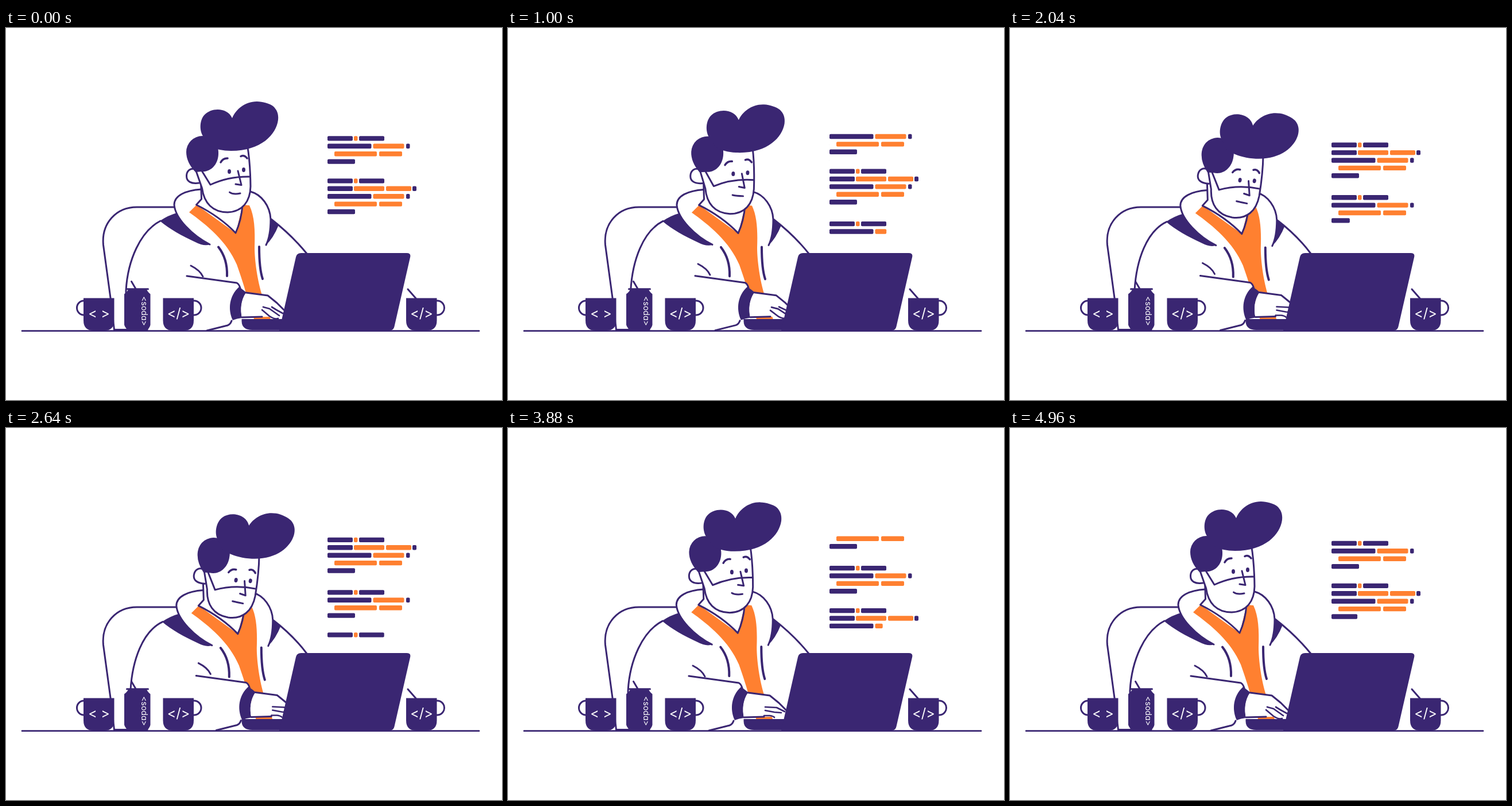
Write an HTML page that moves like this. It is 864x648 px and loops after 5000 ms.

```html
<!DOCTYPE html>
<html lang="en">
<head>
<meta charset="utf-8">
<title>Coding at the desk</title>
<style>
  html, body { margin: 0; width: 100%; height: 100%; overflow: hidden; background: #fff; }
  svg { display: block; width: 100vw; height: 100vh; }
  .line { fill: none; stroke: #3a2672; stroke-width: 3; stroke-linecap: round; stroke-linejoin: round; }
  .white { fill: #fff; }
  .navy { fill: #3a2672; }
  .orange { fill: #ff8030; }
  text { fill: #fff; font-family: Inter, sans-serif; }
  .tag { font-size: 23.5px; text-anchor: middle; }
  .soda { font-size: 14px; text-anchor: middle; font-feature-settings: "cv11"; }
</style>
</head>
<body>
<svg viewBox="0 0 864 648" xmlns="http://www.w3.org/2000/svg">
  <g id="code"></g>

  <path class="line" d="M188.500 525.500 L182 470 L169.500 378 C166 340 192 312 228 312 H300"/>
  <path class="line" d="M188.500 525.500 H246"/>
  <path class="line" id="back"/>
  <path class="line" id="farArm"/>

  <g id="body">
    <path class="navy" d="M268 336 Q283 326 298 322 Q318 350 356 377 Q345 381 330 373 C306 362 285 350 268 336 Z"/>
    <path class="navy" d="M459 331 L475 343 Q466 366 452 379 Q461 360 459 331 Z"/>
    <path class="white" d="M340 281 C312 283 293 292 293 308 C295 332 325 362 355 377 L440 400 L452 379 C459 368 461 350 461 333 C460 310 445 290 426 285 Z"/>
    <path class="line" d="M340 281 C312 283 293 292 293 308 C295 332 325 362 355 377"/>
    <path class="line" d="M426 285 C445 290 460 310 461 333 C461 350 459 366 453 378"/>
    <path class="orange" d="M319 321 L332 308 L400 357 L412 308 L424 309 C433 328 434 352 433 382 C433 405 438 440 446 465 L462 510 H433 L418 462 C415 450 410 435 402 412 C385 372 350 343 319 321 Z"/>
    <path class="white" d="M340 266 V298 L331 307 L400 357 L412 309 L420 285 Z"/>
    <path class="line" d="M339.500 266 L340.500 298 L331.500 308 Q372 328 400 357 Q410 335 412 308"/>
    <path class="line" style="stroke-width:4" d="M370 381.500 Q386 402 385 432 M441 381 C441 403 442 422 447 437"/>
  </g>

  <path class="navy" d="M410.500 507 H484 V526 H429 Q411 526 410.500 511 Z"/>

  <g id="arm">
    <path class="white" d="M315 432 L402 444 Q407 446 408 453 L393 512 Q391 517 386 518 L349 527 H300 Z"/>
    <path class="line" d="M315 432 L402 444 Q406 446 408 453 M393 510 Q391 516 386 518 L350 527"/>
    <path class="line" id="crease" d="M322 414 Q338 422 343 433"/>
    <path class="navy" d="M406 451 Q413 456 419 461 C409 474 408 490 411 505 Q402 506 395 509 C386 490 389 466 406 451 Z"/>
    <path class="white" id="palm"/>
    <path class="line" d="M418 461 L456 466 Q461 470 472 479 L484 491 M411 504 L446 503"/>
    <path class="line" style="stroke-width:2.700" id="fingers"/>
  </g>

  <path class="navy" d="M514 392 H698 Q706 392 704 399.500 L676.500 520 Q675 527 668 527 H476 L505 399 Q506.500 392 514 392 Z"/>

  <g id="head">
    <path class="line" style="fill:#fff" d="M333 247 C321 242 314.500 249 314.500 258 C314.500 267 322 272 336 270"/>
    <path class="line" style="fill:#fff" d="M330 246 L341.500 279 C345 305 360 321 386 321 C412 320 425.500 302 426 276 Q425.500 235 420.500 205"/>
    <g id="face">
      <path class="line" d="M335 239 L356 273 Q388 258 425.500 259"/>
      <ellipse class="navy" cx="389" cy="250" rx="3" ry="4"/>
      <ellipse class="navy" cx="414" cy="247" rx="3" ry="4"/>
      <path class="line" d="M404 249 L410 273.500 L400 272"/>
      <path class="line" id="mouth"/>
      <path class="line" id="brows" style="stroke-width:3.500" d="M374 234 Q378 226.500 386 227 M409 223.500 Q415 220.500 420 227"/>
    </g>
    <path class="navy" d="M314 216 A28 28 0 0 1 370 216 C371 236 358 251 341 250 L330 251 Q314 234 314 216 Z"/>
    <path class="navy" d="M345 191 C336 180 337 160 346 151 C358 138 386 138 394 157 C400 142 416 128 437 128 C447 128 460 132 465 136 C472 142 475 150 474 160 C471 185 445 214 392 214 C378 214 365 211 356 206 Z"/>
  </g>

  <path class="line" style="stroke-width:2.800" d="M28 527.700 H824"/>

  <path class="line" d="M218.500 441.500 L227 456 M210.500 454.700 H247.500"/>
  <path class="navy" d="M213 455 H245 Q246 459 251.500 463.500 V517 Q251 521 246 526.500 H212 Q207 521 206 517 V463.500 Q212 459 213 455 Z"/>
  <text class="soda" transform="translate(236 493) rotate(90)">&lt;soda&gt;</text>

  <path class="line" d="M700 455 L714 471"/>
  <g id="mugs"></g>
</svg>
<script>
const LOOP = 5000, NAVY = "#3a2672", ORANGE = "#ff8030";
const $ = id => document.getElementById(id);

function add(parent, tag, attrs, text) {
  const el = document.createElementNS("http://www.w3.org/2000/svg", tag);
  for (const k in attrs) el.setAttribute(k, attrs[k]);
  if (text) el.textContent = text;
  parent.appendChild(el);
  return el;
}

// Mugs: left edge, handle side, label
function mug(x, side, label) {
  const hx = side < 0 ? x + 2 : x + 53;
  add($("mugs"), "path", { class: "line", d: `M${hx} 475 h${side} a12.500 12.500 0 0 ${side < 0 ? 0 : 1} 0 25 h${-side}` });
  add($("mugs"), "path", { class: "navy", d: `M${x} 470.500 h53.500 v39 q0 17.500 -17.500 17.500 h-18.500 q-17.500 0 -17.500 -17.500 Z` });
  add($("mugs"), "text", { class: "tag", x: x + 27, y: 504.500 }, label);
}
mug(135, -1, "<\u00a0>");
mug(273.5, 1, "</>");
mug(697, 1, "</>");

// Code rows: segments are [start, end, colour]
const ROWS = {
  A: [[560, 604, NAVY], [606, 612.5, ORANGE], [615, 659, NAVY]],
  B: [[560, 604, NAVY], [606, 659, ORANGE], [662, 706, ORANGE], [708, 715, NAVY]],
  C: [[560, 636.5, NAVY], [639.5, 693.5, ORANGE], [697, 703.5, NAVY]],
  D: [[572, 646, ORANGE], [650, 690, ORANGE]],
  E: [[560, 608, NAVY]]
};
const ORDER = "ACDEABCDE", PITCH = 13.4, PERIOD = 165.5, ROW_TOP = 188;

const rows = [];
for (const page of [0, 1]) {
  let start = 0;
  [...ORDER].forEach((kind, i) => {
    const segs = ROWS[kind], x0 = segs[0][0];
    const y = page * PERIOD + i * PITCH + (i > 3 ? 20.4 : 0);
    const g = add($("code"), "g", {});
    const bars = segs.map(([x, end, fill]) => ({ x, end, el: add(g, "rect", { x, y: -4.2, height: 8.4, rx: 2, fill }) }));
    rows.push({ page, y, g, bars, x0, start });
    start += segs[segs.length - 1][1] - x0;
  });
}

const SCROLL = [[0, 192.6], [80, 175.6], [1240, 175.6], [1360, 150.3], [1690, 150.3], [1790, 129.7],
  [2600, 129.7], [2720, 103.9], [3400, 103.9], [3520, 78.6], [4130, 78.6], [4250, 53],
  [4730, 53], [4810, 35.6], [4960, 35.6], [5000, 27.1]];
const TYPED = [[0, 0], [1000, 198], [1480, 285], [2640, 507], [3280, 636], [3880, 755], [4960, 969], [5000, 972]];

function track(keys, t) {
  const i = Math.max(1, keys.findIndex(k => k[0] >= t));
  const [t0, v0] = keys[i - 1], [t1, v1] = keys[i];
  return v0 + (v1 - v0) * (t - t0) / (t1 - t0);
}
function ease(t, from, to) {
  const x = Math.min(1, Math.max(0, (t - from) / (to - from)));
  return x * x * (3 - 2 * x);
}
const mix = (a, b, k) => a + (b - a) * k;
const move = (id, x, y) => $(id).setAttribute("transform", `translate(${x} ${y})`);
const shape = (id, d) => $(id).setAttribute("d", d);

function drawCode(t) {
  const scroll = track(SCROLL, t), typed = track(TYPED, t);
  for (const r of rows) {
    const y = scroll + r.y;
    const limit = r.page ? r.x0 + typed - r.start : Infinity;
    const shown = y > ROW_TOP && limit > r.x0 + 2;
    r.g.style.display = shown ? "" : "none";
    if (!shown) continue;
    r.g.setAttribute("transform", `translate(0 ${y})`);
    for (const b of r.bars) b.el.setAttribute("width", Math.max(0, Math.min(b.end, limit) - b.x));
  }
}

function drawMan(t) {
  const lean = ease(t, 720, 1560) - ease(t, 3160, 4020);
  const reach = ease(t, 487, 1327) - ease(t, 2600, 3240);
  const wave = 0.5 - 0.5 * Math.cos(2 * Math.PI * 16 * t / LOOP);
  const tap = ease(wave, 0.3, 0.55);

  move("body", 3.8 * lean, 1.6 * lean);
  $("head").setAttribute("transform", `translate(${19.8 * lean} ${3 * lean}) rotate(${10 * lean} 342 216)`);
  move("face", -0.8 * lean, 4.5 * lean);
  move("brows", 0, 5 * lean);
  const curve = Math.max(-1, 4.5 - 16 * lean);
  shape("mouth", `M389.500 ${287 - curve * 0.2} Q396 ${288 + curve * 0.6} 408 288`);

  const bx = 209 + 6.5 * reach + 1.5 * lean, sx = 269 + 3.8 * lean, sy = 336 + 1.6 * lean;
  shape("back", `M${bx} 470 V457 C${bx + 3} 405 ${sx - 35} 354 ${sx} ${sy}`);
  shape("farArm", `M${462 + 3.8 * lean} ${333 + 2 * lean} Q${498 + 2 * lean} 361 524 393`);

  move("arm", 16.5 * reach, -0.5 * reach);
  move("crease", -3 * reach, -4 * reach);
  const m = (a, b) => mix(a, b, tap);
  const tipX = m(474, 464), tipY = m(506, 504);
  shape("palm", `M418 461 L456 466 L472 479 L486 492 L480 499 L${tipX} ${tipY} L458 503 L411 504 C408 490 409 474 418 461 Z`);
  shape("fingers",
    `M${m(463, 448)} ${m(486, 486)} L${m(471, 468)} ${m(491, 487)} L482 ${m(497, 494)}` +
    `M448 ${m(486, 492)} L${m(459, 464)} ${m(489, 495)} L476 ${m(501, 496)}` +
    `M446 ${m(491, 501)} L${m(459, 456)} ${m(502, 501)} Q${m(468, 462)} ${m(508, 502)} ${tipX} ${tipY}`);
}

function frame(now) {
  const t = now % LOOP;
  drawCode(t);
  drawMan(t);
  requestAnimationFrame(frame);
}
frame(0);
</script>
</body>
</html>
```
